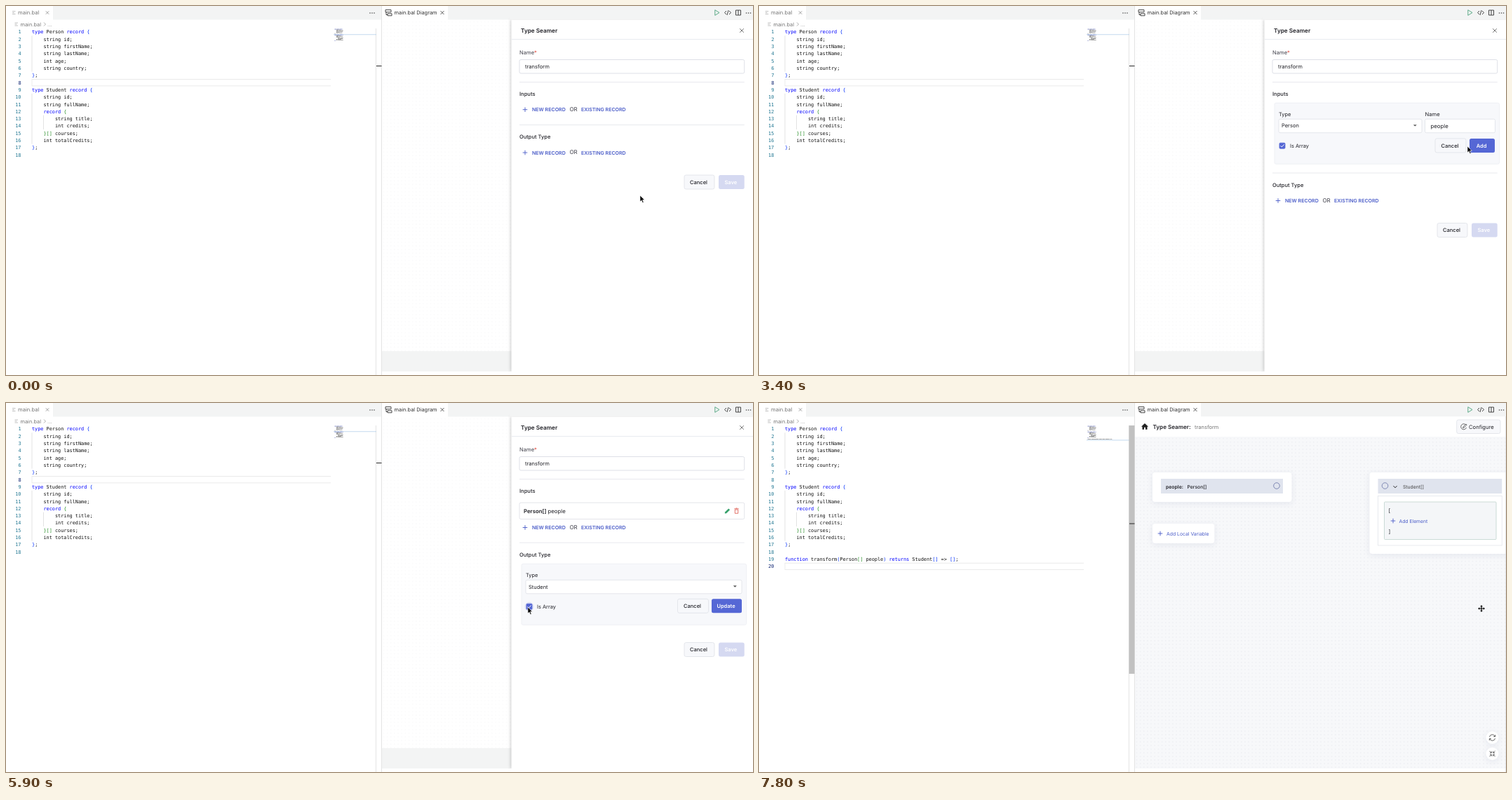
An HTML page that plays this animation: 1065x526 px, repeating every 8000 ms.

```html
<!DOCTYPE html>
<html lang="en">
<head>
<meta charset="utf-8">
<title>Record form</title>
<style>
  html, body { margin: 0; width: 100%; height: 100%; overflow: hidden; background: #fff; }
  svg { display: block; width: 100vw; height: 100vh; }
  text { font-family: Inter, Roboto, sans-serif; white-space: pre; text-rendering: geometricPrecision; }
  .code { font-family: "DejaVu Sans Mono", "Noto Sans Mono", monospace; font-size: 6.85px; }
  .card { fill: #fff; filter: drop-shadow(0 2px 4px #d9dce699); }
  .menu { fill: #fff; filter: drop-shadow(0 1px 1px #0005); }
  .panel { fill: #fff; filter: drop-shadow(-1px 0 2px #0003); }
</style>
</head>
<body>
<svg viewBox="0 0 1065 526">
  <defs>
    <pattern id="faint" width="5.15" height="5.15" x="536" y="20" patternUnits="userSpaceOnUse">
      <circle cx="2.5" cy="2.5" r=".45" fill="#e9eaed"/>
    </pattern>
    <pattern id="dots" width="5.15" height="5.15" x="536" y="48" patternUnits="userSpaceOnUse">
      <circle cx="2.5" cy="2.5" r=".5" fill="#dadce3"/>
    </pattern>
  </defs>
  <g id="chrome"></g>
  <g id="editor"></g>
  <g id="view"></g>
  <g id="pointer"></g>
</svg>
<script>
const LOOP = 8000, STEP = 100;
const BLUE = '#5567d5', LINK = '#4a5cc8', INK = '#222228', TITLE = 'Type Seamer';
const $ = id => document.getElementById(id);

const at = {
  inputForm: 600, inputMenu: 1000, inputPicked: 1500, retype: 2000, inputArray: 3100, inputDone: 3700,
  outputForm: 4300, outputMenu: 4600, outputPicked: 5200, outputArray: 5800, outputDone: 6400,
  codeAdded: 7200, mapper: 7400
};

// Text is placed by its vertical middle.
const text = (x, y, label, size = 7.5, fill = INK, weight = 400, anchor = 'start') =>
  `<text x="${x}" y="${y + size * .36}" font-size="${size}" fill="${fill}" font-weight="${weight}" text-anchor="${anchor}">${label}</text>`;
const rect = (x, y, w, h, fill = '#fff', stroke = 'none', r = 0, cls = '') =>
  `<rect x="${x}" y="${y}" width="${w}" height="${h}" rx="${r}" ${cls ? `class="${cls}"` : `fill="${fill}" stroke="${stroke}" stroke-width=".8"`}/>`;
const path = (d, stroke = INK, width = .9, fill = 'none', x = 0, y = 0) =>
  `<path transform="translate(${x} ${y})" d="${d}" stroke="${stroke}" stroke-width="${width}" fill="${fill}"/>`;
const cross = (x, y, color, r = 2.5) => path(`M${-r} ${-r}L${r} ${r}M${r} ${-r}L${-r} ${r}`, color, .8, 'none', x, y);
const plus = (x, y) => path('M-3.3 0H3.3M0-3.3V3.3', LINK, .9, 'none', x, y);
const ellipsis = (x, y) => [-3, 0, 3].map(d => `<circle cx="${x + d}" cy="${y}" r=".8" fill="#444"/>`).join('');

function button(x, y, w, label, kind = 'plain') {
  const look = {
    plain: ['#f7f8fb', '#dfe1e8', INK, 500],
    off: ['#d5d9f1', 'none', '#fff', 600],
    on: [BLUE, 'none', '#fff', 600]
  }[kind];
  return rect(x, y - 10, w, 20, look[0], look[1], 2.5) + text(x + w / 2 - 1, y, label, 7.5, look[2], look[3], 'middle');
}

/* ---------- window frame ---------- */

function chrome() {
  const listIcon = (x, y) => path('M0-2H4.500M0 0H3M0 2H4.500', '#aaa', .7, 'none', x, y);
  return rect(67, 0, 468, 19.5, '#f3f4f4') + rect(630, 0, 435, 19.5, '#f3f4f4') +
    listIcon(9, 9.5) + text(17, 9.5, 'main.bal', 7.6, '#777') + cross(59, 9.5, '#888', 2.2) + ellipsis(522, 10) +
    listIcon(12.5, 26) + text(20.5, 26, 'main.bal', 7.4, '#777') + path('M-1-2.500L1.500 0-1 2.500', '#888', .7, 'none', 55, 26) + text(59, 26, '...', 7.4, '#777') +
    path('M535.500 0V526', '#dedede', .8) + path('M527.500 32V526', '#dedede', .8) +
    path('M-4-4H4V-.8H-4ZM-1 1.300H5V4.300H-1ZM-3-.8V3H-1', '#333', .9, 'none', 545, 9.500) +
    text(553.5, 9.5, 'main.bal Diagram', 7.45, '#333') + cross(622, 9.5, '#333') +
    path('M-2.700-3.800L3.500 0-2.700 3.800Z', '#4ba27b', .9, 'none', 1013.5, 9.5) +
    path('M-2-2.500L-4.500 0-2 2.500M2-2.500L4.500 0 2 2.500M1-3.500L-1 3.500', '#333', .9, 'none', 1029, 9.5) +
    path('M-3.500-3.500H3.500V3.500H-3.500ZM0-3.500V3.500', '#333', .9, 'none', 1044, 9.5) + ellipsis(1058.5, 10);
}

/* ---------- code editor ---------- */

const SOURCE = `type Person record {
    string id;
    string firstName;
    string lastName;
    int age;
    string country;
};

type Student record {
    string id;
    string fullName;
    record {
        string title;
        int credits;
    }[] courses;
    int totalCredits;
};
`;
const ADDED = '\nfunction transform(Person[] people) returns Student[] => [];\n';
const BRACKETS = ['#0431fa', '#319331', '#7b3814'];
const rowY = n => 37 + 10.31 * (n - 1);

function highlight(source) {
  let depth = 0;
  const tint = (color, s) => `<tspan fill="${color}">${s}</tspan>`;
  return source.replace(/\b(?:type|record|function|returns)\b|=>|[{}()[\]]/g, s => {
    if (s === '=>') return '=&gt;';
    if ('{[('.includes(s)) return tint(BRACKETS[depth++], s);
    if ('}])'.includes(s)) return tint(BRACKETS[--depth], s);
    return tint('#0000ff', s);
  }).split('\n');
}

function editor(added) {
  const source = added ? SOURCE + ADDED : SOURCE, active = added ? 20 : 8, y = rowY(active);
  const guide = (x, from, to) => path(`M${x} ${rowY(from) - 5}V${rowY(to) + 5}`, '#d6d6d6', .7);
  let out = rect(37, y - 4.7, 427, 9.4, 'none', '#e5e5e5') + rect(463, y - 6, 2, 12);
  out += guide(37, 2, 6) + guide(37, 10, 16) + guide(53.5, 13, 14);
  highlight(source).forEach((line, i) => {
    const base = rowY(i + 1) + 2.4;
    out += `<text class="code" x="21.5" y="${base}" text-anchor="end" fill="${i + 1 === active ? '#0b216f' : '#237893'}">${i + 1}</text>` +
      `<text class="code" x="37" y="${base}" fill="#111">${line}</text>`;
  });
  const mapY = n => 33 + 1.02 * (n - 1);
  out += path(`M467 ${mapY(active) + .6}H528`, '#a9cbe8', .7);
  source.split('\n').forEach((line, i) => {
    for (const word of line.matchAll(/\S+/g))
      out += rect(468.5 + word.index * .58, mapY(i + 1) - .3, word[0].length * .58, .7, i % 8 ? '#777' : '#5560b0');
  });
  if (added) out += rect(527.5, 32, 8, 354, '#c1c1c1');
  return out + path(`M528 ${added ? 172 : 85.5}H535.500`, '#333', 1.1);
}

/* ---------- side panel ---------- */

const links = y => plus(740, y) + text(750, y, 'NEW RECORD', 7.05, LINK, 600) +
  text(803.5, y - .6, 'OR', 8, '#40404b') + text(820, y, 'EXISTING RECORD', 7, LINK, 600);

function recordCard(y, type, name) {
  return rect(732, y - 11.7, 320.7, 23.4, '#fff', '#dcdee5', 2) +
    `<text x="738" y="${y + 2.9}" font-size="7.8" fill="${INK}"><tspan font-weight="600">${type}</tspan> ${name}</text>` +
    path('M-3.800 3.800L-3.200 1.500 1.700-3.400 3.600-1.500-1.400 3.400Z', 'none', 0, '#36a06b', 1028.5, y) +
    path('M-2.200-1.800H2.200V3.500H-2.200ZM-3.200-3H3.200M-1-3.800H1', '#e0665c', .9, 'none', 1041.5, y);
}

function recordForm(y, f) {
  const right = f.wide ? 1049 : 945, mid = y + 33;
  let out = rect(735, y, 320.5, 87, '#f7f8fb', '#eceef3', 2) + text(741, y + 16.3, 'Type', 7.4) +
    rect(741, mid - 10, right - 741, 19.5, '#fff', '#dfe1e8', 2) + text(745, mid - .5, f.type, 7.5) +
    path(f.menu ? 'M-2.500 1.200L0-1.200 2.500 1.200Z' : 'M-2.500-1.200L0 1.200 2.500-1.200Z', 'none', 0, '#555', right - 9.7, mid - .8);
  if (!f.wide)
    out += text(949.5, y + 16.3, 'Name', 7.6) + rect(949.5, mid - 10, 100, 19.5, '#fff', '#dfe1e8', 2) + text(957.5, mid, f.name, 7.8);
  if (f.glow) out += `<circle cx="746" cy="${y + 61}" r="6.500" fill="#dfe2f6"/>`;
  out += rect(742, y + 57, 8, 8, f.array ? BLUE : '#fff', f.array ? BLUE : '#555', 1.2);
  if (f.array) out += path('M-2.500 0L-.7 1.800 2.600-1.800', '#fff', 1, 'none', 746, y + 61);
  out += text(757, y + 61.5, 'Is Array', 7.4);
  const ready = f.type ? 'on' : 'off';
  out += f.wide
    ? button(957.5, y + 60, 44, 'Cancel') + button(1006, y + 60, 43, 'Update', ready)
    : button(964, y + 60.7, 44, 'Cancel') + button(1013, y + 60.7, 36, 'Add', ready);
  if (f.menu) {
    const w = right - 749;
    out += rect(745, y + 43.8, w, 50, '', '', 1, 'menu') + rect(745, y + (f.second ? 69 : 48.5), w, 20.5, '#ebebeb') +
      text(754, y + 58.7, 'Person') + text(754, y + 79.3, 'Student');
  }
  return out;
}

function inputName(t) {
  if (t < at.inputPicked) return '';
  return t < at.retype ? 'person' : 'people'.slice(0, (t - at.retype) / STEP);
}

function panel(t) {
  let shift = 0, inputs, output, foot = 251;
  if (t < at.inputForm) inputs = links(147.7);
  else if (t < at.inputDone) {
    shift = 68.5;
    const picked = t >= at.inputPicked;
    inputs = recordForm(138.2, {
      type: picked ? 'Person' : '', name: inputName(t), menu: t >= at.inputMenu && !picked,
      array: t >= at.inputArray, glow: t >= 3000 && t < 3200
    });
  } else {
    shift = 29.6;
    inputs = recordCard(153.8, 'Person[]', 'people') + links(177.5);
  }
  foot += shift;
  if (t < at.outputForm) output = links(209 + shift);
  else if (t < at.outputDone) {
    foot = 351.5;
    const picked = t >= at.outputPicked;
    output = recordForm(229.3, {
      wide: true, type: picked ? 'Student' : '', menu: t >= at.outputMenu && !picked, second: t >= 5000,
      array: t >= at.outputArray, glow: t >= 5700 && t < 6000
    });
  } else {
    foot = 290.5;
    output = recordCard(244.7, 'Student[]', '');
  }
  const rule = y => path(`M732 ${y}H1052.700`, '#e2e4ea', .8);
  return rect(536, 20, 184, 472, 'url(#faint)') + rect(536, 492, 186, 29, '#f3f4f4') +
    rect(720.5, 19.5, 344.5, 501.5, '', '', 0, 'panel') + rect(718, 521, 347, 5) + rect(718, 15, 347, 4.5, '#f3f4f4') +
    text(734, 34.7, TITLE, 8.2, INK, 600) + cross(1049, 35, '#555', 2.8) + path('M721 47.500H1065', '#e4e6ec', .8) +
    text(732, 66.3, 'Name<tspan fill="#e0453a">*</tspan>', 7.6, '#40404b') +
    rect(732, 76.5, 320.7, 19.5, '#fff', '#d6d9e1', 2) + text(740, 86.4, 'transform', 7.6) +
    rule(108.5) + text(732, 125.4, 'Inputs', 7.6, INK, 500) +
    rule(169.5 + shift) + text(732, 186.5 + shift, 'Output Type', 7.5, INK, 500) +
    button(967, foot, 43, 'Cancel') + button(1016, foot, 36.7, 'Save', t >= at.outputDone ? 'on' : 'off') +
    inputs + output;
}

/* ---------- mapping view ---------- */

function mapper() {
  const port = x => `<circle cx="${x}" cy="118" r="4.300" fill="none" stroke="#6871a5" stroke-width=".8"/>`;
  const round = (y, icon) => `<circle cx="1045.500" cy="${y}" r="9" class="card"/>` + path(icon, '#444', .8, 'none', 1045.5, y);
  return rect(536, 19.5, 529, 507) + rect(536, 48, 529, 473, '#f7f8fa') + rect(536, 48, 529, 473, 'url(#dots)') +
    path('M-5 0L0-4.700 5 0H3.500V4H1V1H-1V4H-3.500V0Z', 'none', 0, '#222', 550, 33.7) +
    text(561.5, 34, TITLE + ':', 8.1, INK, 600) + text(621, 34, 'transform', 7.5, '#777') +
    rect(994.7, 24, 62.3, 19.5, '#f7f8fb', '#dfe1e8', 2.5) +
    path('M2-3.500A4 4 0 1 0 3.500 1M-1.500 1.500L-1 0 3-4 4.200-2.800 0 1.200Z', '#444', .8, 'none', 1005, 34) +
    text(1012, 34, 'Configure', 7.65, INK) +
    rect(561, 99, 198.5, 42, '', '', 4, 'card') + rect(573, 108, 174, 21, '#e0e4ee') +
    text(580, 119.5, 'people:', 6.9, INK, 600) + text(610.5, 119.5, 'Person[]', 6.8, INK, 500) + port(738) +
    rect(561, 172, 88.3, 28, '', '', 4, 'card') + plus(572, 186) + text(581, 186.3, 'Add Local Variable', 6.85, LINK) +
    rect(870.5, 99, 200, 116, '', '', 4, 'card') + rect(882.5, 108, 176.7, 21, '#e0e4ee') + port(892.5) +
    path('M-2.500-1.300L0 1.300 2.500-1.300', '#222', 1, 'none', 907, 119.5) + text(918, 119.7, 'Student[]', 6.8, '#444') +
    rect(882.5, 132.5, 176.7, 70.5, '#fff', '#e3e5ec') + rect(891.5, 141, 159.5, 53.5, '#f4f6f8', '#bfd3cd', 1) +
    text(897.5, 153, '[', 7.5) + plus(904, 168) + text(912.5, 168.3, 'Add Element', 6.8, LINK) + text(897.5, 183, ']', 7.5) +
    round(477, 'M-4-1A4 4 0 0 1 3.700-1.700M4 1A4 4 0 0 1-3.700 1.700M4.200-4V-1.500H1.700M-4.200 4V1.500H-1.700') +
    round(500, 'M-4-4L-1.200-1.200V-3.500M-1.200-1.200H-3.500M4-4L1.200-1.200V-3.500M1.200-1.200H3.500M-4 4L-1.200 1.200V3.500M-1.200 1.200H-3.500M4 4L1.200 1.200V3.500M1.200 1.200H3.500') +
    path('M1064.500 19V526', '#dedfe3', .8);
}

/* ---------- pointer ---------- */

const SHAPES = {
  arrow: path('M0 0V9L2.100 7.100 3.600 10.500 5.100 9.800 3.600 6.500H6.400Z', '#fff', .6, '#000'),
  hand: path('M-.8 .6Q-.8-.4 0-.4T.9 .6V3.500Q2.200 2.700 2.700 3.900 4 3.300 4.400 4.500 5.800 4.200 5.800 5.500V7.500Q5.500 9 4.800 10.300H.2Q-.8 8.500-2.700 6.300-2.800 5-.8 6Z', '#111', .9, '#fff') +
    path('M1.200 6.500V8.700M2.700 6.500V8.700M4.100 6.500V8.700', '#111', .5),
  move: path('M-3 0H3M0-3V3', '#000', 1.2) + path('M0-5L-1.800-2.700H1.800ZM0 5L-1.800 2.700H1.800ZM-5 0L-2.700-1.800V1.800ZM5 0L2.700-1.800V1.800Z', 'none', 0, '#000')
};
// time, x, y, shape kept until the next stop
const ROUTE = [
  [0, 904, 270, 'arrow'], [400, 852, 147, 'hand'], [600, 852, 147, 'arrow'], [900, 842, 170, 'arrow'], [1000, 842, 170, ''],
  [1300, 790, 196, 'hand'], [1500, 790, 196, 'arrow'], [1800, 985, 171, ''], [2700, 985, 180, 'arrow'], [3000, 744, 198, 'hand'],
  [3200, 744, 198, 'arrow'], [3400, 1010, 200, 'arrow'], [3500, 1028, 198, 'hand'], [3700, 1028, 198, 'arrow'],
  [4100, 852, 237, 'hand'], [4300, 852, 237, 'arrow'], [4500, 830, 261, 'hand'], [4800, 807.5, 285, 'hand'],
  [5000, 790, 306, 'hand'], [5200, 790, 306, 'arrow'], [5700, 744, 291, 'hand'], [5900, 744, 291, 'arrow'],
  [6200, 1026, 288, 'hand'], [6900, 1027, 290, 'hand'], [7400, 1028, 292, 'move'], [7600, 1030, 293, 'move'], [LOOP, 1030, 293, 'move']
];

function pointer(t) {
  const i = ROUTE.findIndex(stop => stop[0] > t);
  const [t0, x0, y0, shape] = ROUTE[i - 1], [t1, x1, y1] = ROUTE[i];
  const p = (t - t0) / (t1 - t0), k = p * p * (3 - 2 * p);
  return shape ? `<g transform="translate(${x0 + (x1 - x0) * k} ${y0 + (y1 - y0) * k})">${SHAPES[shape]}</g>` : '';
}

/* ---------- playback ---------- */

const shown = {};
function put(id, markup) {
  if (shown[id] !== markup) $(id).innerHTML = shown[id] = markup;
}

function play(now) {
  const t = Math.floor(now % LOOP / STEP) * STEP;
  put('editor', editor(t >= at.codeAdded));
  put('view', t < at.mapper ? panel(t) : mapper());
  put('pointer', pointer(t));
  requestAnimationFrame(() => play(performance.now() - start));
}

put('chrome', chrome());
const start = performance.now();
play(0);
</script>
</body>
</html>
```
